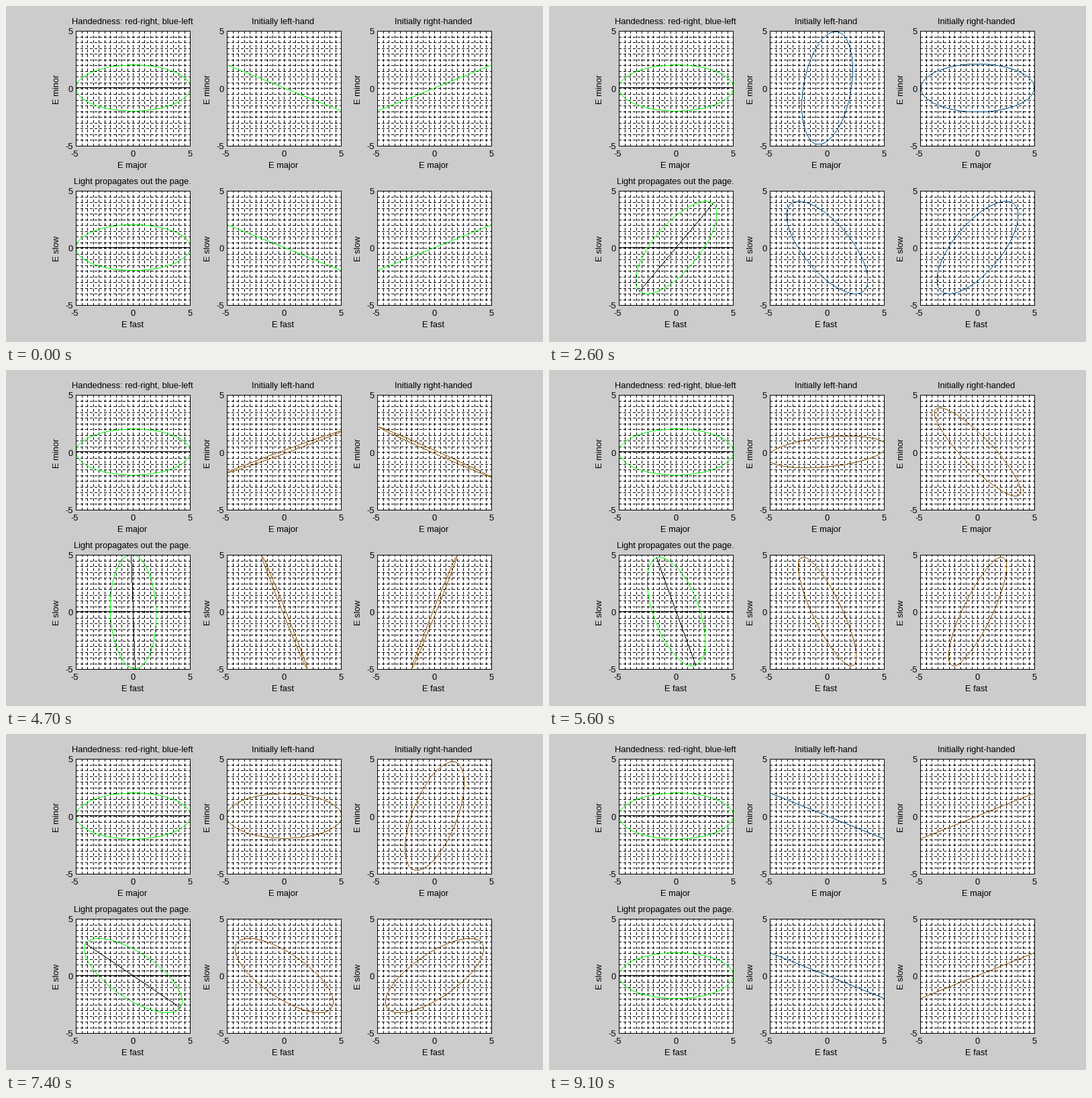
Write a matplotlib script that moves like this. It is 800 px wide and 500 px high and loops after 9200 ms.

```python
import numpy as np
import matplotlib.pyplot as plt
from matplotlib.animation import FuncAnimation

W, H, DPI = 800, 500, 100
PX = 72 / DPI                      # one pixel in points
FRAMES, INTERVAL = 92, 100
MAJOR, MINOR, LIM = 5, 2, 5
UNIT = 17                          # pixels per field unit
GREEN, BLUE, BROWN = "#00ff00", "#005488", "#885400"

plt.rcParams.update({
    "font.family": "Liberation Sans",
    "font.size": 12.9 * PX,
})

fig = plt.figure(figsize=(W / DPI, H / DPI), dpi=DPI, facecolor="#cccccc")
t = np.linspace(0, 2 * np.pi, 101)


def label(x, y, text, ha="center", **kw):
    fig.text(x / W, 1 - y / H, text, ha=ha, va="baseline", **kw)


def stepped(x, y):
    """Resample a polyline so that neighbouring points are one pixel apart."""
    x, y = np.asarray(x), np.asarray(y)
    steps = np.maximum(abs(np.diff(x)), abs(np.diff(y))) * UNIT
    travel = np.concatenate(([0], np.cumsum(steps)))
    at = np.arange(0, travel[-1] + 0.5)
    return np.interp(at, travel, x), np.interp(at, travel, y)


def curve(ax, color, x=(0, 0), y=(0, 0)):
    """A hard-edged line, one pixel wide."""
    return ax.plot(*stepped(x, y), ",", color=color)[0]


def panel(left, top, bottom, title, xlabel, ylabel):
    """Dotted-grid axes whose edges sit on the given pixel columns and rows."""
    ax = fig.add_axes([left / W, 1 - bottom / H,
                       LIM * 2 * UNIT / W, (bottom - top) / H])
    ticks = np.arange(-LIM + 0.5, LIM, 0.5)
    dots = dict(colors="k", lw=PX, linestyles=(0.5, (3, 3)),
                antialiased=False, snap=True, zorder=1)
    ax.hlines(ticks, -LIM, LIM, **dots)
    ax.vlines(ticks, -LIM, LIM, **dots)
    ax.set(xlim=(-LIM, LIM), ylim=(-LIM, LIM), xticks=[], yticks=[])
    for spine in ax.spines.values():
        spine.set_linewidth(PX)

    middle = (top + bottom) / 2
    label(left + 84, top - 10, title)
    label(left + 84, bottom + 33, xlabel)
    label(left - 25, middle + 1.5, ylabel, rotation=90, rotation_mode="anchor")
    for text, dx, y in (("-5", -1.5, bottom), ("0", 85.5, middle), ("5", 170.5, top)):
        label(left + dx, bottom + 16, text)
        label(left - 4, y + 5, text, ha="right")
    return ax


lefts = (104, 329, 553)
titles = ("Handedness: red-right, blue-left", "Initially left-hand",
          "Initially right-handed")
upper = [panel(x, 37, 208, title, "E major", "E minor")
         for x, title in zip(lefts, titles)]
lower = [panel(x, 275, 445, title, "E fast", "E slow")
         for x, title in zip(lefts, ("Light propagates out the page.", "", ""))]

for ax in (upper[0], lower[0]):
    curve(ax, "k", (-LIM, LIM), (0, 0))
curve(upper[0], GREEN, MAJOR * np.cos(t), MINOR * np.sin(t))
input_ellipse = curve(lower[0], GREEN)
major_axis = curve(lower[0], "k")
outputs = [(curve(upper[i], GREEN), curve(lower[i], GREEN), sign)
           for i, sign in ((1, 1), (2, -1))]


def rotate(x, y, angle):
    c, s = np.cos(angle), np.sin(angle)
    return x * c - y * s, x * s + y * c


def field(phase, sign):
    return MAJOR * np.cos(phase), sign * MINOR * np.sin(phase)


def output_color(frame, twist, sign):
    if frame == 0:
        return GREEN
    if abs(twist) < 1e-9:
        twist = sign
    return BLUE if twist > 0 else BROWN


def update(frame):
    theta = np.radians(2 * max(frame - 1, 0))
    twist = np.sin(2 * theta)
    input_ellipse.set_data(*stepped(*rotate(*field(t, 1), theta)))
    axis_ends = rotate(np.array([-MAJOR, MAJOR]), np.zeros(2), theta)
    major_axis.set_data(*stepped(*axis_ends))

    for top_line, bottom_line, sign in outputs:
        # Quarter-wave plate: the slow component lags by 90 degrees.
        fast = rotate(*field(t, sign), theta)[0]
        slow = rotate(*field(t - np.pi / 2, sign), theta)[1]
        bottom_line.set_data(*stepped(fast, slow))
        top_line.set_data(*stepped(*rotate(fast, slow, -theta)))
        for line in (top_line, bottom_line):
            line.set_color(output_color(frame, twist, sign))
    return []


anim = FuncAnimation(fig, update, frames=FRAMES, interval=INTERVAL,
                     repeat=True, repeat_delay=0, blit=False)
plt.show()
```
